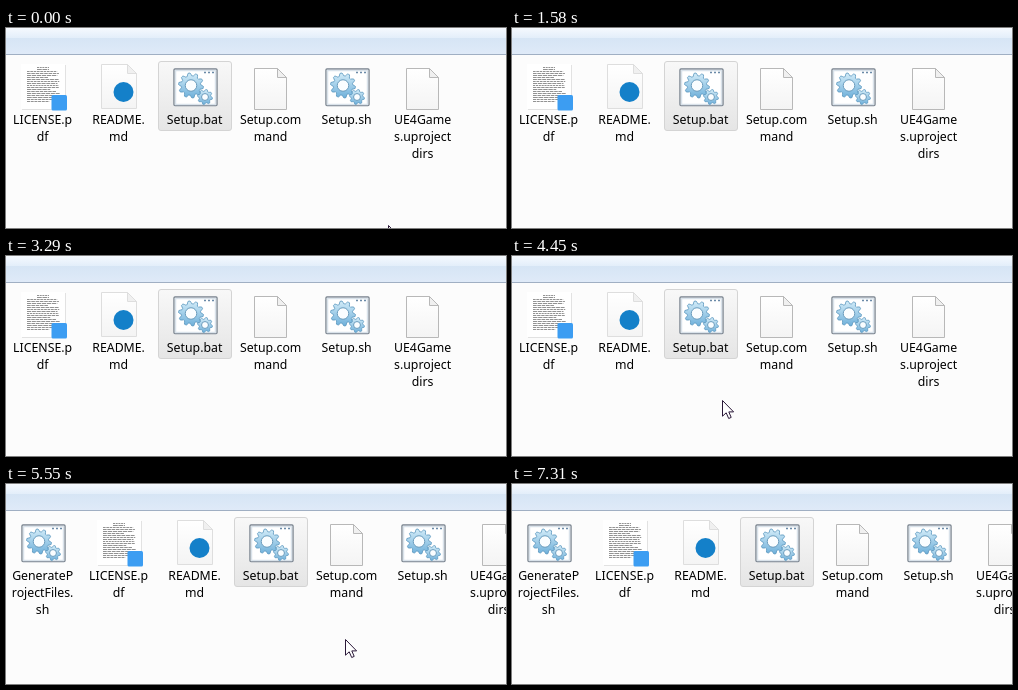
Animation of 500x200 px, one loop 8.17 s. Source, as an HTML page:

```html
<!DOCTYPE html>
<html lang="en">
<head>
<meta charset="utf-8">
<title>File list</title>
<style>
  html, body { margin: 0; width: 100%; height: 100%; overflow: hidden; background: #fcfcfc; }
  svg { display: block; }
  text { font: 12.3px "Noto Sans", "Open Sans", sans-serif; fill: #000; text-anchor: middle; }
</style>
</head>
<body>
<svg width="500" height="200" viewBox="0 0 500 200">
  <defs id="defs"></defs>
  <rect width="500" height="200" fill="#fcfcfc"/>
  <rect width="500" height="10" fill="url(#upper)"/>
  <rect y="10" width="500" height="16" fill="url(#lower)"/>
  <rect y="26" width="500" height="1" fill="#a0afc3"/>
  <g id="files"></g>
  <path id="cursor" d="M.5 .5V16.2L4.2 12.8 6.7 18.5 9.2 17.4 6.8 11.9H11.6Z" fill="#fff" stroke="#2a1838"/>
</svg>
<script>
const LOOP = 8170, PITCH = 76, SCROLL = 5550;
const $ = id => document.getElementById(id);

const gradients = {
  upper: ['#f5f9fe', '#e3eefa'], lower: ['#d6e5f5', '#dfeaf8'],
  gray: ['#f8f8f8', '#e5e5e5'], blue: ['#dcebfc', '#c1dbfc'], pale: ['#f0f6fd', '#dceafc'],
  steel: ['#d3ecf8', '#6fb0da'], paper: ['#ffffff', '#f4f4f4']
};
const borders = { gray: '#d4d4d4', blue: '#7da2ce', pale: '#b0cdf0' };

$('defs').innerHTML = Object.entries(gradients).map(([id, [top, bottom]]) =>
  `<linearGradient id="${id}" x2="0" y2="1"><stop stop-color="${top}"/><stop offset="1" stop-color="${bottom}"/></linearGradient>`
).join('');

// Toothed ring: the radius follows a clipped sine wave.
function gear(cx, cy, r, teeth) {
  const n = teeth * 8;
  const pts = Array.from({ length: n }, (_, i) => {
    const a = i / n * Math.PI * 2;
    const wave = Math.max(-1, Math.min(1, 2 * Math.sin(a * teeth)));
    const d = r * (.89 + .11 * wave);
    return `${(cx + d * Math.cos(a)).toFixed(2)} ${(cy + d * Math.sin(a)).toFixed(2)}`;
  });
  return `<path d="M${pts.join('L')}Z" fill="url(#steel)" stroke="#5795bd" stroke-width=".8"/>
    <circle cx="${cx}" cy="${cy}" r="${r * .46}" fill="#fafdff" stroke="#6a9cbd"/>`;
}

// Icons are drawn around x = 0, the middle of a tile.
const page = (x, y, w, h, edge) => `
  <path d="M${x} ${y}h${w - 9}l9 9v${h - 9}h${-w}z" fill="url(#paper)" stroke="${edge}"/>
  <path d="M${x + w - 9} ${y}v9h9z" fill="#f0f0f0" stroke="${edge}" stroke-linejoin="round"/>`;

function thumbnail() {
  let seed = 7;
  const rnd = () => (seed = seed * 16807 % 2147483647) / 2147483647;
  let out = `<rect x="-21" y="37" width="44" height="45" fill="#e2e2e2"/>
    <rect x="-22" y="36" width="44" height="45" fill="#fff"/>`;
  for (let i = 0; i < 18; i++) {
    const title = i < 2;
    const w = title ? 12 : i % 6 === 5 ? 14 + rnd() * 10 : 29 + rnd() * 4;
    const x = title ? -w / 2 : -16;
    out += `<path d="M${x} ${39.5 + i * 2}h${w}" stroke="#777" stroke-width=".8" stroke-dasharray="${2 + rnd() * 3} .7"/>`;
  }
  return out + '<rect x="8.5" y="67" width="15.5" height="15.5" rx="1.5" fill="#3c9df2"/>';
}

const icons = {
  script: `<rect x="-21" y="41" width="43" height="36.5" rx="1" fill="#fff" stroke="#79838e" stroke-width="1.4"/>
    <rect x="-19.5" y="42.5" width="40" height="34" fill="none" stroke="#d9e2ea" stroke-width="1.5"/>
    <path d="M9 44.5h2m2 0h2m2 0h2" stroke="#6b8aa8" stroke-width="1.4"/>
    ${gear(-4, 57.5, 12.5, 10)}${gear(10, 69, 7.5, 8)}`,
  thumb: thumbnail(),
  note: page(-17.5, 36.5, 35, 44, '#dedede') + '<circle cx="4.5" cy="64" r="10" fill="#1480c9"/>',
  blank: page(-16.5, 40.5, 32, 41, '#b8b8b8')
};

const items = [
  ['script', 'GenerateP', 'rojectFiles.', 'sh'],
  ['thumb', 'LICENSE.p', 'df'],
  ['note', 'README.', 'md'],
  ['script', 'Setup.bat'],
  ['blank', 'Setup.com', 'mand'],
  ['script', 'Setup.sh'],
  ['blank', 'UE4Game', 's.uproject', 'dirs']
];

$('files').innerHTML = items.map(([icon, ...lines], i) => `
  <g transform="translate(${37 + (i - 1) * PITCH})">
    ${lines[0] === 'Setup.bat' ? '<rect id="tile" x="-36.5" y="33.5" width="73" height="69" rx="2.5"/>' : ''}
    ${icons[icon]}
    ${lines.map((s, n) => `<text x="-.4" y="${96 + n * 17}">${s}</text>`).join('')}
  </g>`).join('');

// Each stroke follows a quadratic curve in even jumps, then rests until the pointer leaves.
const strokes = [
  { start: 0, end: 330, until: 960, jumps: 5, path: [[382, 197], [260, 122], [198, 80]] },
  { start: 960, end: 1510, until: 1580, jumps: 1, path: [[197, 72], [202, 93], [208, 114]] },
  { start: 4220, end: 4850, until: SCROLL, jumps: 8, path: [[108, 156], [261, 124], [322, 178]] },
  { start: SCROLL, end: 6010, until: 6090, jumps: 6, path: [[339, 155], [362, 163], [391, 193]] },
  { start: 6700, end: 6860, until: 7010, jumps: 2, path: [[436, 158], [400, 108], [381, 88]] },
  { start: 7010, end: 7160, until: 7310, jumps: 2, path: [[381, 88], [404, 130], [426, 196]] }
];

function pointer(t) {
  const s = strokes.find(s => t >= s.start && t < s.until);
  if (!s) return null;
  const done = Math.floor((t - s.start) / (s.end - s.start) * s.jumps + .1);
  const u = Math.min(1, done / s.jumps), [a, b, c] = s.path;
  return a.map((v, i) => Math.round(v * (1 - u) ** 2 + 2 * b[i] * u * (1 - u) + c[i] * u * u));
}

function tileLook(t) {
  const within = (from, to) => t >= from && t < to;
  if (within(880, 960)) return 'pale';
  return within(330, 880) || within(3140, 3290) ? 'blue' : 'gray';
}

function draw(t) {
  const spot = pointer(t), look = tileLook(t);
  $('cursor').style.display = spot ? '' : 'none';
  if (spot) $('cursor').setAttribute('transform', `translate(${spot})`);
  $('tile').setAttribute('fill', `url(#${look})`);
  $('tile').setAttribute('stroke', borders[look]);
  $('files').setAttribute('transform', `translate(${t < SCROLL ? 0 : PITCH})`);
}

const start = performance.now();
function tick() {
  draw((performance.now() - start) % LOOP);
  requestAnimationFrame(tick);
}
tick();
</script>
</body>
</html>
```
